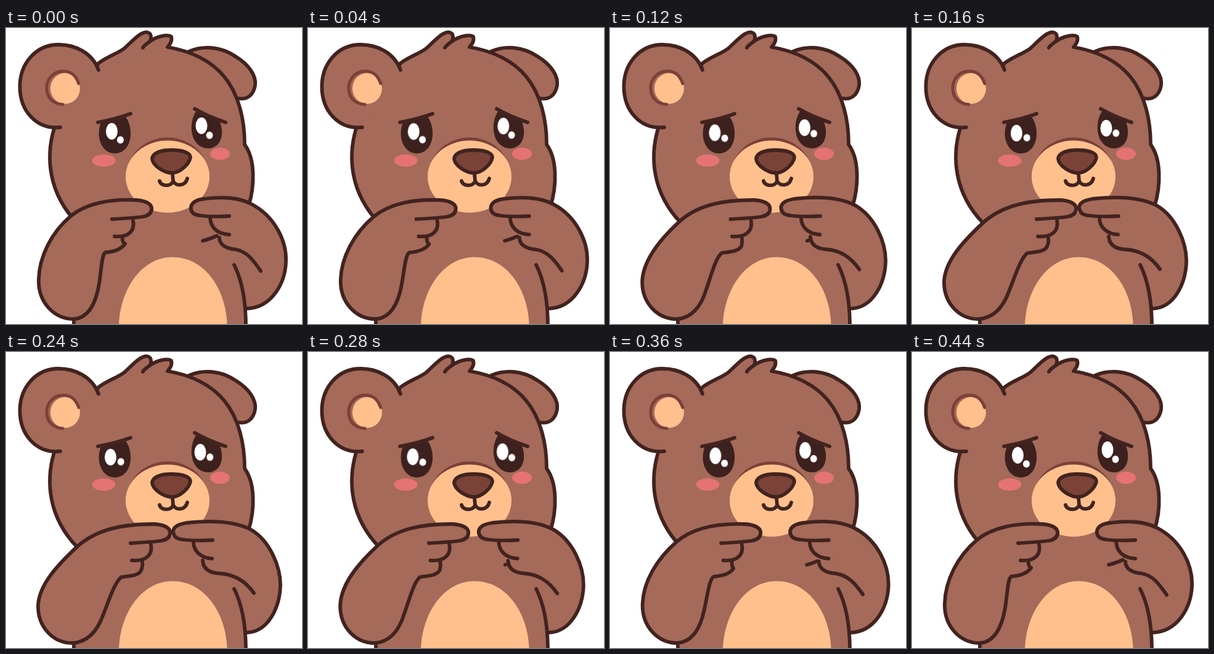
Recreate the animation shown at these times as an HTML page without scripts. Size 480 by 480 pixels, loop 0.48 s.

```html
<!DOCTYPE html>
<html lang="en">
<head>
<meta charset="utf-8">
<title>Shy bear</title>
<style>
  html, body { margin: 0; width: 100%; height: 100%; overflow: hidden; background: #fff; }
  svg { display: block; width: 100vw; height: 100vh; }

  :root {
    --fur: #a56a5a;
    --ink: #42231f;
    --peach: #ffc08d;
    --shade: #7c4039;
    /* how close the fingers are, held for one twelfth of the loop each */
    --poke: linear(
      0 0% 8.333%, .12 8.333% 16.667%, .42 16.667% 25%, .78 25% 33.333%,
      1 33.333% 41.667%, 1.02 41.667% 50%, 1 50% 58.333%, .8 58.333% 66.667%,
      .53 66.667% 75%, .27 75% 83.333%, .08 83.333% 91.667%, 0 91.667% 100%);
  }

  .fur, .body { fill: var(--fur); }
  .line { fill: none; }
  .fur, .line { stroke: var(--ink); stroke-width: 5.8; stroke-linecap: round; stroke-linejoin: round; }
  .peach { fill: var(--peach); }
  .ring { fill: none; stroke: var(--shade); stroke-width: 5; stroke-linecap: round; }
  .shade { fill: var(--shade); }
  .nose { fill: #7b4338; }
  .eye { fill: #3d211e; }
  .cheek { fill: #e57373; }
  .glint { fill: #fff; }

  .move { animation: .48s var(--poke) infinite; }
  .arm-l { animation-name: arm-l; }
  .hand-l { animation-name: hand-l; }
  .arm-r { animation-name: arm-r; }
  .hand-r { animation-name: hand-r; }
  .big-l { animation-name: big-l; }
  .big-r { animation-name: big-r; }
  .small { animation-name: small; }

  @keyframes arm-l {
    from { d: path("M172 310C190 309 208 308 222 306C232 304 237 299 236 291C234 284 226 280 210 279C170 277 130 284 105 305C73 332 54 371 53 408C52 445 78 472 110 472C135 470 146 445 151 415C155 390 155 368 161 364C174 363 186 360 193 350"); }
    to { d: path("M202 310C220 309 240 308 252 306C262 304 267 299 266 291C264 284 256 280 240 279C190 279 147 287 115 316C83 346 53 378 52 412C52 445 75 472 108 472C135 470 150 448 158 425C168 400 176 374 187 365C200 363 216 363 219 354"); }
  }
  @keyframes hand-l {
    from { d: path("M206 312C209 326 202 340 176 338M189 340C188 344 190 348 193 350"); }
    to { d: path("M235 312C238 326 230 340 204 338M221 340C222 346 221 350 219 354"); }
  }
  @keyframes arm-r {
    from { d: path("M362 305C345 306 328 306 314 304C304 303 299 298 300 290C302 281 312 278 322 277C350 273 378 275 397 285C436 305 455 345 454 378C453 415 430 454 390 455"); }
    to { d: path("M335 305C318 306 300 306 286 304C276 303 271 298 271 290C273 281 283 279 293 277C330 273 370 274 397 288C428 306 445 348 445 378C444 415 425 454 390 455"); }
  }
  @keyframes hand-r {
    from { d: path("M331 308C332 322 341 334 362 335M346 340C346 352 358 358 372 359C390 362 400 375 413 394M319 345C328 343 335 340 342 337"); }
    to { d: path("M304 308C304 322 315 334 334 335M319 338C320 352 330 358 345 359C370 360 388 371 402 391M320 345C320 345 320 345 320 345"); }
  }
  @keyframes big-l { to { transform: translate(-2px, 3px); } }
  @keyframes big-r { to { transform: translate(-2px, 4px); } }
  @keyframes small { to { transform: translate(.7px, -3.5px); } }
</style>
</head>
<body>
<svg viewBox="0 0 480 480">
  <!-- body -->
  <path class="body" d="M110 480V340L130 280H389V480Z"/>
  <path class="peach" d="M183 480C186 420 222 371.5 270 371.5C320 371.5 356 420 358.500 480Z"/>
  <path class="line" d="M110 470V484"/>

  <!-- head and ears -->
  <path class="fur" d="M297 38C320 28 348 30 372 46C395 60 406 78 404 93C401 110 390 117 376 114"/>
  <path class="fur" d="M115 316C69 268 64 210 78 163L150 57C167 45 180 42 192 33C206 20 218 6 229 7C238 9 235 19 233 22C245 13 262 10 268 14C270 21 266 26 262 31C299 37 333 53 354 79C378 108 387 150 387 189C404 212 404 255 393 290"/>
  <path class="line" d="M233 22C229 25 224 28 222 32"/>
  <path class="fur" d="M150 68C140 40 112 27 85 27C48 27 22.500 58 22.500 95C22.500 135 50 165 88 161"/>
  <ellipse class="peach" cx="96" cy="98" rx="24" ry="25"/>
  <path class="ring" d="M118 90C112 74 103 70 93 70C76 70 66 84 66 97C66 113 76 123 92 124"/>

  <!-- muzzle -->
  <ellipse class="shade" cx="262" cy="236" rx="65" ry="58.5"/>
  <ellipse class="peach" cx="262" cy="241" rx="68" ry="58.5"/>
  <path class="line" d="M270 237L271 248M249 248C251 257 268 258 271 248C276 258 291 256 294 244"/>
  <path class="line nose" d="M237 212C238 202 252 198 268 198C286 198 299 202 299 210C297 221 282 235 269 235C256 235 238 223 237 212Z"/>

  <!-- eyes and cheeks -->
  <path class="eye" d="M154 153Q176 150 194 144C204 158 205 180 196 193C186 207 167 207 157 193C149 181 149 166 154 153Z"/>
  <path class="eye" d="M309 134Q325 144 346 150C353 166 351 182 342 190C331 199 315 196 307 184C298 170 299 148 309 134Z"/>
  <path class="line" d="M149 153Q178 148 202 139M306 131Q326 143 356 153"/>
  <ellipse class="glint move big-l" cx="171.500" cy="167.500" rx="9.500" ry="13.500"/>
  <ellipse class="glint move big-r" cx="317" cy="158.500" rx="9.500" ry="13.500"/>
  <ellipse class="glint move small" cx="185.500" cy="181.500" rx="5.500" ry="6"/>
  <ellipse class="glint move small" cx="330" cy="174" rx="5.500" ry="6"/>
  <ellipse class="cheek" cx="158.500" cy="215" rx="19" ry="10"/>
  <ellipse class="cheek" cx="347" cy="204" rx="16" ry="10"/>

  <!-- arms -->
  <path class="fur move arm-l"/>
  <path class="line move hand-l"/>
  <path class="fur move arm-r"/>
  <path class="line move hand-r"/>
  <path class="line" d="M370 384C382 408 389 440 389 484"/>
</svg>
</body>
</html>
```
